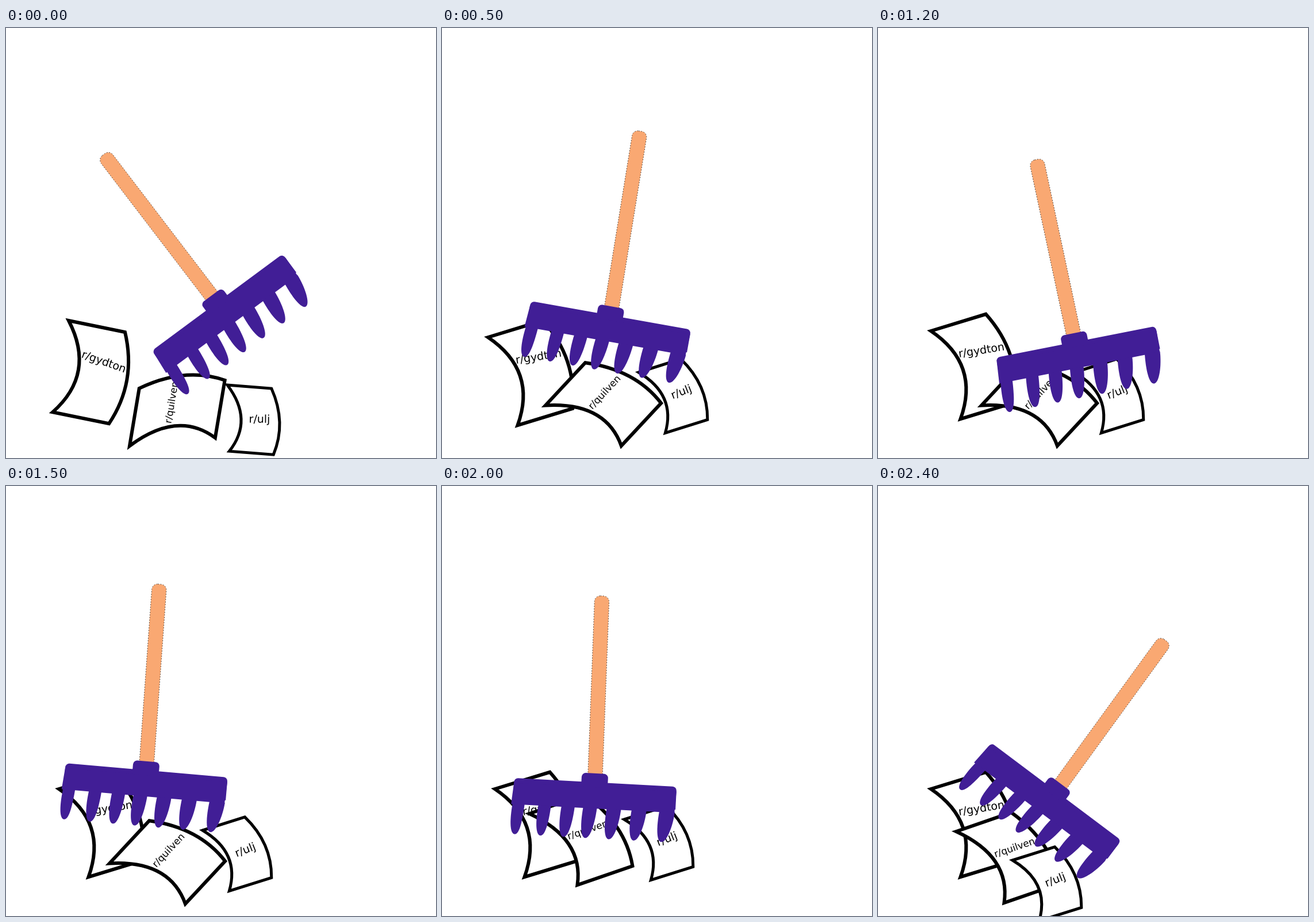
An HTML page with a canvas that plays this animation: 748 by 748 pixels, repeating every 2500 ms.

```html
<!DOCTYPE html>
<html lang="en">
<head>
<meta charset="utf-8">
<title>Raking papers</title>
<style>
  html, body { margin: 0; width: 100%; height: 100%; overflow: hidden; background: #fff; }
  canvas { display: block; width: 748px; height: 748px; }
</style>
</head>
<body>
<canvas id="stage" width="748" height="748"></canvas>
<script>
const ctx = document.getElementById('stage').getContext('2d');
const LOOP = 2500, STEP = 100;
const GLIDE = 200;  // ms a sheet needs to slide to its next place
const LIFT = 12;    // px the rake rises between two places
const PURPLE = '#411e96', ORANGE = '#f9a872';

// Places: time of arrival, x, y, degrees
const rakePath = [
  [0, 357.5, 465.5, -36.5], [500, 295.5, 484.5, 10.1], [900, 228, 522.5, 23],
  [1200, 340, 531, -11.15], [1500, 245, 479, 5], [1800, 325.5, 518.5, -11.15],
  [2200, 208, 505.5, 17.3], [2400, 318.5, 518.5, 36.9]
];

const sheets = [
  { label: 'r/gydton', size: 19, tilt: 8, textY: 58, w: 100, h: 161.5, skew: 4.5, line: 6,
    path: [[0, 109, 509, 11.5], [500, 80, 538, -17], [900, 92, 527, -17]] },
  { label: 'r/quilven', size: 16.7, tilt: 0, textY: 59, w: 101.5, h: 144.5, skew: 38.5, line: 6,
    path: [[0, 215, 727, -80.5], [500, 180, 656.5, -47], [1700, 152, 570, -19], [2400, 136, 601, -19]] },
  { label: 'r/ulj', size: 19, tilt: -4, textY: 55, w: 77, h: 114.5, skew: 12.5, line: 5,
    path: [[0, 385, 621, 4.5], [500, 342, 599, -17.5], [1800, 317, 580, -17.5],
           [2200, 245, 557, -17.5], [2400, 234, 651, -17.5]] }
];

// Place at time t, moving only in the last `glide` ms before each arrival
function pose(path, t, glide = Infinity, lift = 0) {
  const n = path.findIndex(p => p[0] > t);
  if (n < 0) return path[path.length - 1].slice(1);
  const [from, ...a] = path[n - 1], [to, ...b] = path[n];
  const span = Math.min(glide, to - from);
  const k = Math.max(0, 1 - (to - t) / span);
  const p = a.map((v, i) => v + (b[i] - v) * k);
  p[1] -= lift * Math.sin(Math.PI * k);
  return p;
}

function placed([x, y, deg], draw) {
  ctx.save();
  ctx.translate(x, y);
  ctx.rotate(deg * Math.PI / 180);
  draw();
  ctx.restore();
}

// A skewed sheet whose two long sides bow the same way
function drawSheet({ label, size, tilt, textY, w, h, skew, line }) {
  const inner = h * 0.26, outer = w + h * 0.145;
  ctx.beginPath();
  ctx.moveTo(0, 0);
  ctx.lineTo(w, 0);
  ctx.bezierCurveTo(outer + skew / 3, h / 3, outer + skew * 2 / 3, h * 2 / 3, w + skew, h);
  ctx.lineTo(skew, h);
  ctx.bezierCurveTo(inner + skew * 2 / 3, h * 2 / 3, inner + skew / 3, h / 3, 0, 0);
  ctx.closePath();
  ctx.fillStyle = '#fff';
  ctx.fill();
  ctx.strokeStyle = '#000';
  ctx.lineWidth = line;
  ctx.stroke();

  placed([w / 2 + skew * textY / h + h * 0.14, textY, tilt], () => {
    ctx.fillStyle = '#000';
    ctx.font = size + 'px "DejaVu Sans", sans-serif';
    ctx.textAlign = 'center';
    ctx.fillText(label, 0, 6);
  });
}

function drawHandle() {
  placed([-5, -309, -0.9], () => {
    ctx.beginPath();
    ctx.roundRect(-12.7, 0, 25.4, 320, [10, 10, 0, 0]);
    ctx.fillStyle = ORANGE;
    ctx.fill();
    ctx.setLineDash([1.5, 3]);
    ctx.strokeStyle = '#222';
    ctx.lineWidth = 0.9;
    ctx.stroke();
  });
}

function drawTooth(i) {
  // spacing widens towards the ends
  const tip = -11.5 + i * (39 + 0.4 * i * i) + 1.6 * Math.abs(i);
  const left = tip - 6.5, right = tip + 17.5 + i;
  ctx.beginPath();
  ctx.moveTo(left, 60);
  ctx.bezierCurveTo(tip - 10, 88, tip - 9, 113, tip, 113);
  ctx.bezierCurveTo(tip + 9, 113, right - 2, 85, right, 60);
  ctx.fill();
}

function drawHead() {
  ctx.fillStyle = PURPLE;
  ctx.beginPath();
  ctx.roundRect(-23.5, 0, 46, 30, 7);
  ctx.roundRect(-140.5, 15.5, 283, 40, [7, 7, 0, 0]);
  ctx.fill();
  ctx.beginPath();
  ctx.moveTo(-140.5, 24);
  ctx.lineTo(142.5, 24);
  ctx.lineTo(141, 61);
  ctx.lineTo(-143.5, 61);
  ctx.fill();
  for (let i = -3; i <= 3; i++) drawTooth(i);
}

function render(t) {
  ctx.fillStyle = '#fff';
  ctx.fillRect(0, 0, 748, 748);
  for (const s of sheets) placed(pose(s.path, t, GLIDE), () => drawSheet(s));
  placed(pose(rakePath, t, Infinity, LIFT), () => { drawHandle(); drawHead(); });
}

const start = performance.now();
function tick() {
  const t = (performance.now() - start) % LOOP;
  render(Math.floor(t / STEP) * STEP);
  requestAnimationFrame(tick);
}
tick();
</script>
</body>
</html>
```
